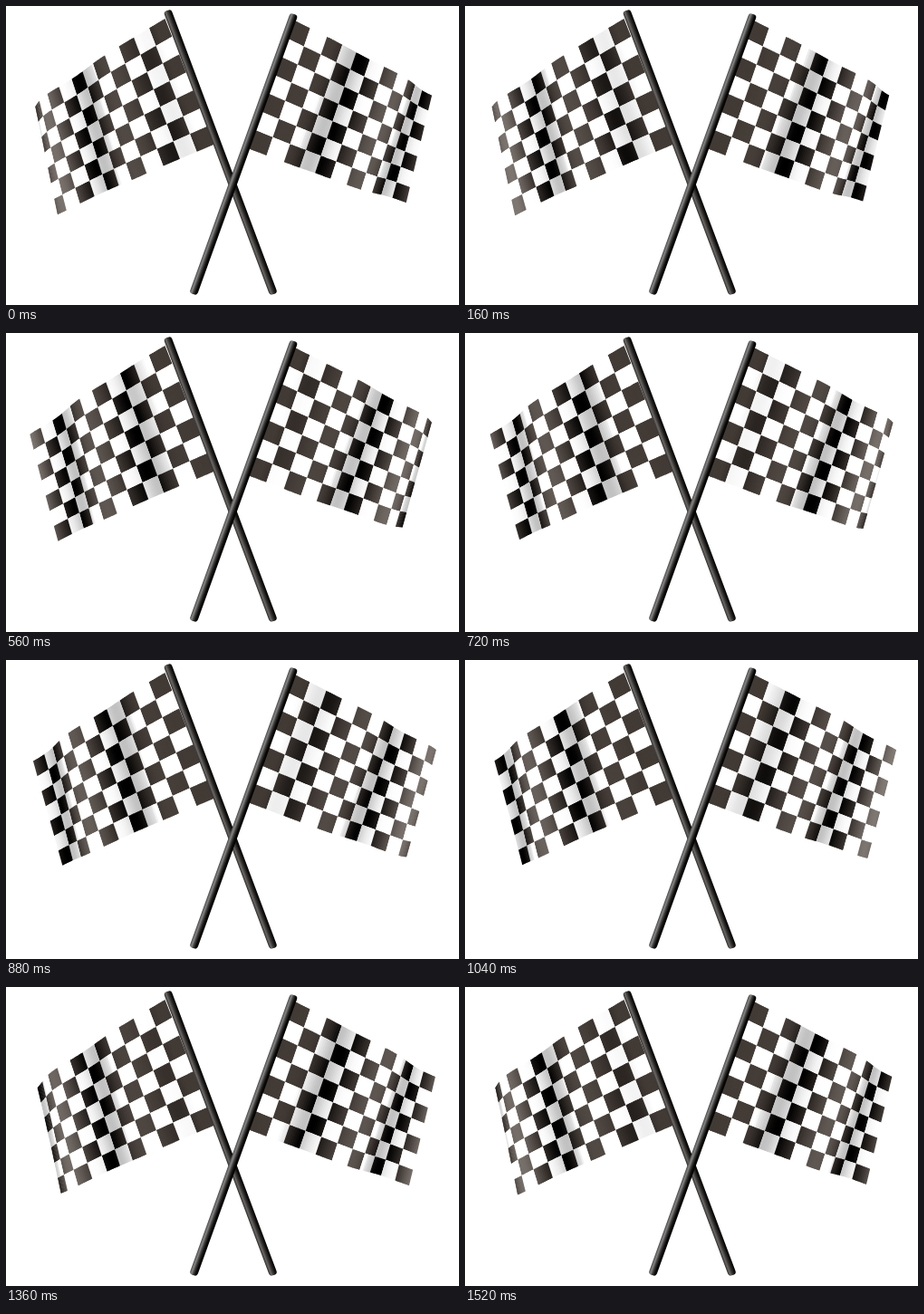
An HTML page with a canvas that plays this animation: 500x330 px, repeating every 1.6 s.

```html
<!DOCTYPE html>
<html lang="en">
<head>
<meta charset="utf-8">
<title>Crossed checkered flags</title>
<style>
html, body { margin: 0; width: 100%; height: 100%; overflow: hidden; background: #fff; }
canvas { display: block; }
</style>
</head>
<body>
<canvas id="stage" width="500" height="330"></canvas>
<script>
const ctx = document.getElementById('stage').getContext('2d');
const LOOP = 1600, STEP = 80;
const COLS = 11, ROWS = 7, STRIPS = 8;
const WAVELENGTH = 5.6; // in columns

// Edges run through the middle of the first and last row:
// start point, then slope and bend per column for x and y.
const flags = [
  {
    top: { x: 179.4, y: 23.9, dx: -18.3, bx: 0.45, dy: 10.6, by: -0.17 },
    bottom: { x: 226.2, y: 142.7, dx: -20, bx: 0.42, dy: 8.6, by: -0.14 },
    side: 1, crest: 0.3, tilt: 0.9
  },
  {
    top: { x: 312.6, y: 25, dx: 20, bx: -0.52, dy: 9.8, by: -0.21 },
    bottom: { x: 271, y: 147, dx: 20.3, bx: -0.42, dy: 8, by: -0.22 },
    side: -1, crest: 3.9, tilt: -0.5
  }
];

const mix = (a, b, k) => a + (b - a) * k;
const clamp = x => Math.max(0, Math.min(1, x));
const bell = (x, width) => Math.exp(-((x / width) ** 2));
const rgb = (r, g, b) => `rgb(${Math.round(r)},${Math.round(g)},${Math.round(b)})`;

function edgePoint(e, u) {
  return [e.x + e.dx * u + e.bx * u * u, e.y + e.dy * u + e.by * u * u];
}

// Signed distance in columns to the nearest fold.
function foldOffset(flag, u, v, phase) {
  const q = u - 0.5 - flag.crest - phase * WAVELENGTH - flag.tilt * v / ROWS;
  return q - WAVELENGTH * Math.round(q / WAVELENGTH);
}

function clothPoint(flag, u, v, phase) {
  const a = edgePoint(flag.top, u), b = edgePoint(flag.bottom, u);
  const k = (v - 0.5) / 6;
  const wave = Math.cos(2 * Math.PI * foldOffset(flag, u, v, phase) / WAVELENGTH);
  const sway = wave * (u / COLS) ** 1.3;
  return [
    mix(a[0], b[0], k) + flag.side * 4.2 * sway,
    mix(a[1], b[1], k) - (0.4 + 2.2 * v / ROWS) * sway
  ];
}

function clothColor(dark, u, q) {
  const strength = clamp((u - 0.6) / 2.2);
  if (dark) {
    const black = strength * bell(q, 1.15);
    const far = 0.5 - 0.5 * Math.cos(2 * Math.PI * q / WAVELENGTH);
    const glow = 65 * (u / COLS) ** 1.5 * far ** 2;
    const tone = c => (c + glow) * (1 - black);
    return rgb(tone(66), tone(58), tone(53));
  }
  const edge = clamp((q + 1.5) / 0.2);
  const gray = 255 - 62 * strength * edge * bell(q + 0.5, 0.95);
  return rgb(gray, gray, gray);
}

function drawFlag(flag, phase) {
  for (let row = 0; row < ROWS; row++) {
    for (let col = 0; col < COLS; col++) {
      const dark = (row + col) % 2 === 0;
      for (let s = 0; s < STRIPS; s++) {
        const u0 = col + s / STRIPS;
        const u1 = Math.min(col + 1, u0 + 1.6 / STRIPS);
        const mid = u0 + 0.5 / STRIPS;
        ctx.fillStyle = clothColor(dark, mid, foldOffset(flag, mid, row + 0.5, phase));
        ctx.beginPath();
        ctx.moveTo(...clothPoint(flag, u0, row, phase));
        ctx.lineTo(...clothPoint(flag, u1, row, phase));
        ctx.lineTo(...clothPoint(flag, u1, row + 1, phase));
        ctx.lineTo(...clothPoint(flag, u0, row + 1, phase));
        ctx.fill();
      }
    }
  }
}

function drawPole(x0, y0, x1, y1, colors) {
  const width = 9;
  ctx.save();
  ctx.translate(x0, y0);
  ctx.rotate(Math.atan2(y1 - y0, x1 - x0) - Math.PI / 2);
  const shade = ctx.createLinearGradient(-width / 2, 0, width / 2, 0);
  colors.forEach((c, i) => shade.addColorStop(i / (colors.length - 1), c));
  ctx.fillStyle = shade;
  ctx.beginPath();
  ctx.roundRect(-width / 2, 0, width, Math.hypot(x1 - x0, y1 - y0), 3.5);
  ctx.fill();
  ctx.restore();
}

function draw(time) {
  const phase = Math.floor((time % LOOP) / STEP) * STEP / LOOP;
  ctx.fillStyle = '#fff';
  ctx.fillRect(0, 0, 500, 330);
  flags.forEach(flag => drawFlag(flag, phase));
  drawPole(178, 5, 295.5, 318, ['#2c2a28', '#6a6866', '#3a3735', '#171513', '#000']);
  drawPole(318, 9, 206.5, 318, ['#4a4a4a', '#858585', '#3c3a38', '#0c0b0a', '#000']);
}

const start = performance.now();
function tick() {
  draw(performance.now() - start);
  requestAnimationFrame(tick);
}
tick();
</script>
</body>
</html>
```
